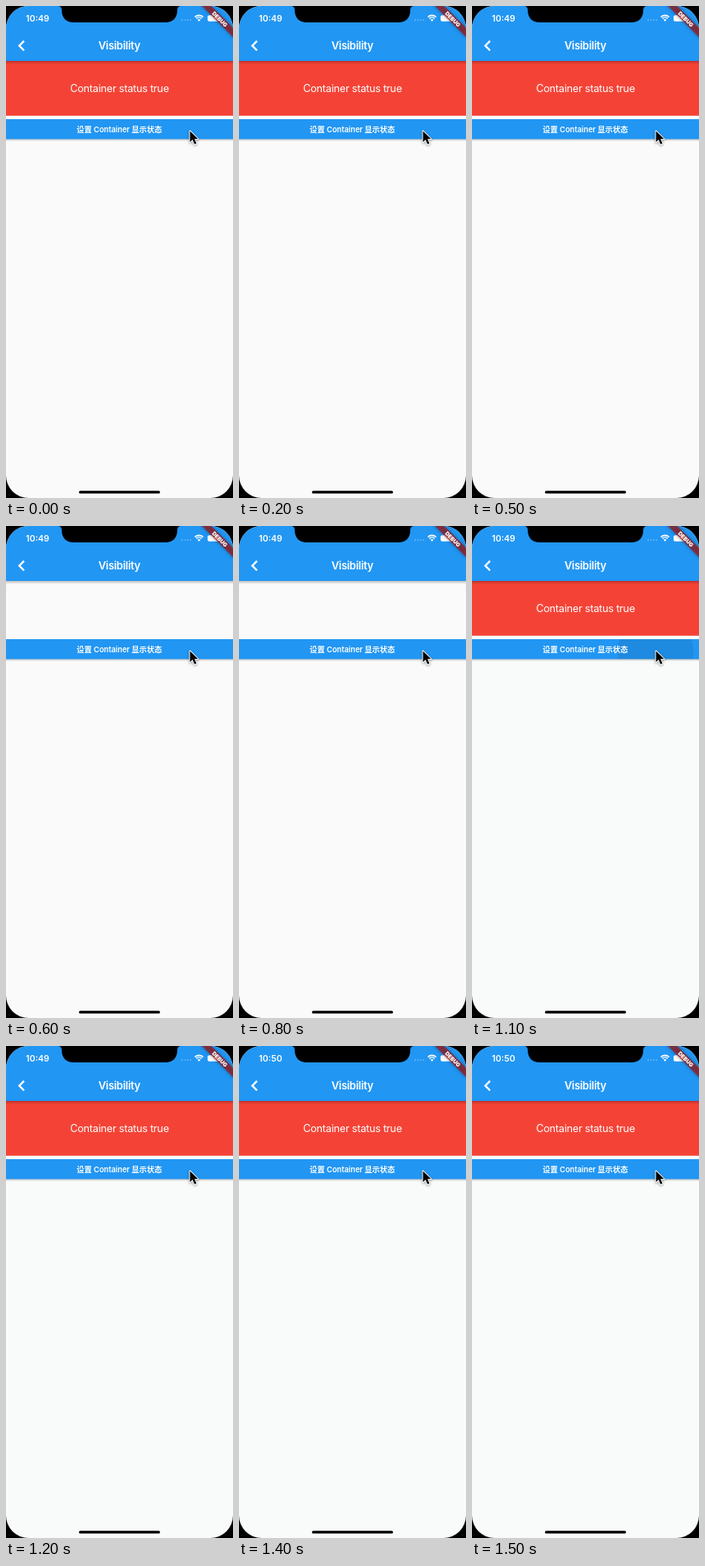
Animation of 277 by 600 pixels, one loop 1.6 s. Source, as an HTML page with a canvas:

```html
<!DOCTYPE html>
<html lang="zh">
<head>
<meta charset="utf-8">
<title>Visibility</title>
<style>
  html, body { margin: 0; width: 100%; height: 100%; overflow: hidden; background: #000; }
  canvas { display: block; width: 277px; height: 600px; }
</style>
</head>
<body>
<canvas id="stage"></canvas>
<script>
const W = 277, H = 600, LOOP = 1600;
const HIDE_AT = 600, PRESS_AT = 1000, SHOW_AT = 1100, MINUTE_AT = 1400;
const BLUE = '#2196f3', RED = '#f44336';
const SANS = 'Inter, "Noto Sans CJK SC", "Noto Sans CJK", sans-serif';

const canvas = document.getElementById('stage');
const ctx = canvas.getContext('2d');
const dpr = window.devicePixelRatio || 1;
canvas.width = W * dpr;
canvas.height = H * dpr;

function rect(x, y, w, h, color) {
  ctx.fillStyle = color;
  ctx.fillRect(x, y, w, h);
}

function pill(x, y, w, h, r, color) {
  ctx.beginPath();
  ctx.roundRect(x, y, w, h, r);
  ctx.fillStyle = color;
  ctx.fill();
}

function circle(x, y, r) {
  ctx.beginPath();
  ctx.arc(x, y, r, 0, Math.PI * 2);
}

function label(text, x, y, size, weight, spacing = 0) {
  ctx.font = `${weight} ${size}px ${SANS}`;
  ctx.letterSpacing = `${spacing}px`;
  ctx.textAlign = 'center';
  ctx.textBaseline = 'alphabetic';
  ctx.fillStyle = '#fff';
  ctx.fillText(text, x, y);
}

function shadow(y, height, alpha) {
  const fade = ctx.createLinearGradient(0, y, 0, y + height);
  fade.addColorStop(0, `rgba(0,0,0,${alpha})`);
  fade.addColorStop(1, 'rgba(0,0,0,0)');
  rect(0, y, W, height, fade);
}

function drawButton(t) {
  shadow(162, 3, 0.26);
  rect(0, 138, W, 24.3, BLUE);
  if (t >= SHOW_AT && t < SHOW_AT + 100) {
    ctx.save();
    ctx.beginPath();
    ctx.rect(0, 138, W, 24.3);
    ctx.clip();
    circle(224, 152, 46);
    ctx.fillStyle = 'rgba(0,0,0,0.08)';
    ctx.fill();
    ctx.restore();
  }
  label('设置 Container 显示状态', 138.3, 153.5, 9.25, 600);
}

function drawStatus(t) {
  label(t < MINUTE_AT ? '10:49' : '10:50', 38.5, 19, 10.6, 600);

  ctx.fillStyle = 'rgba(255,255,255,0.35)';
  for (let i = 0; i < 4; i++) {
    circle(215 + i * 3.4, 17.2, 0.85);
    ctx.fill();
  }

  const up = -Math.PI / 2, spread = 0.78;
  ctx.strokeStyle = '#fff';
  ctx.lineWidth = 1.6;
  for (const r of [7.2, 4.6]) {
    ctx.beginPath();
    ctx.arc(235.5, 18.6, r, up - spread, up + spread);
    ctx.stroke();
  }
  ctx.beginPath();
  ctx.moveTo(235.5, 18.8);
  ctx.arc(235.5, 18.8, 2.7, up - spread, up + spread);
  ctx.fillStyle = '#fff';
  ctx.fill();

  pill(246, 11.2, 14, 7.6, 2, '#fff');
}

function drawHeader() {
  shadow(67, 4, 0.24);
  rect(0, 0, W, 67, BLUE);
  label('Visibility', 138.3, 53, 12.9, 600, -0.25);
  ctx.beginPath();
  ctx.moveTo(22, 42.6);
  ctx.lineTo(16.2, 48.4);
  ctx.lineTo(22, 54.2);
  ctx.strokeStyle = '#fff';
  ctx.lineWidth = 2.3;
  ctx.stroke();
}

function drawBanner() {
  ctx.save();
  ctx.translate(W, 0);
  ctx.rotate(Math.PI / 4);
  ctx.save();
  ctx.shadowColor = 'rgba(0,0,0,0.5)';
  ctx.shadowBlur = 4 * dpr;
  rect(-30, 18.7, 60, 8.1, 'rgba(160,24,24,0.72)');
  ctx.restore();
  label('DEBUG', 0, 25.2, 6.7, 900);
  ctx.restore();
}

function drawNotch() {
  ctx.beginPath();
  ctx.moveTo(63, 0);
  ctx.quadraticCurveTo(68, 0, 68, 5);
  ctx.bezierCurveTo(68, 14, 73, 20, 83, 20);
  ctx.lineTo(194, 20);
  ctx.bezierCurveTo(204, 20, 209, 14, 209, 5);
  ctx.quadraticCurveTo(209, 0, 214, 0);
  ctx.fillStyle = '#000';
  ctx.fill();
}

function drawPointer(pressed) {
  if (pressed) {
    circle(224, 153, 21.3);
    ctx.strokeStyle = 'rgba(255,255,255,0.6)';
    ctx.lineWidth = 3.4;
    ctx.stroke();
    ctx.strokeStyle = '#000';
    ctx.lineWidth = 1.7;
    ctx.stroke();
  }
  const outline = [[224.5, 152.5], [224.5, 166], [227.6, 163.1], [230, 168.6],
                   [232.4, 167.5], [230, 162.3], [234.2, 162.1]];
  ctx.save();
  ctx.beginPath();
  outline.forEach(([x, y]) => ctx.lineTo(x, y));
  ctx.closePath();
  ctx.lineJoin = 'round';
  ctx.strokeStyle = '#fff';
  ctx.lineWidth = 2;
  ctx.shadowColor = 'rgba(0,0,0,0.4)';
  ctx.shadowBlur = 3 * dpr;
  ctx.shadowOffsetY = dpr;
  ctx.stroke();
  ctx.restore();
  ctx.fillStyle = '#000';
  ctx.fill();
}

function draw(t) {
  const visible = t < HIDE_AT || t >= SHOW_AT;
  ctx.setTransform(dpr, 0, 0, dpr, 0, 0);
  rect(0, 0, W, H, '#000');

  ctx.save();
  ctx.beginPath();
  ctx.roundRect(0, 0, W, H, 27.5);
  ctx.clip();
  rect(0, 0, W, H, t < SHOW_AT ? '#fafafa' : '#f9fbfa');
  if (visible) {
    rect(0, 67, W, 66.8, RED);
    label('Container status true', 138.5, 105, 12.7, 400, -0.25);
  }
  drawButton(t);
  drawHeader();
  drawStatus(t);
  drawBanner();
  drawNotch();
  pill(89, 591.2, 99, 3.4, 1.7, '#000');
  ctx.restore();

  drawPointer(t >= PRESS_AT && t < SHOW_AT);
}

const start = performance.now();
function frame() {
  draw((performance.now() - start) % LOOP);
  requestAnimationFrame(frame);
}
frame();
</script>
</body>
</html>
```
